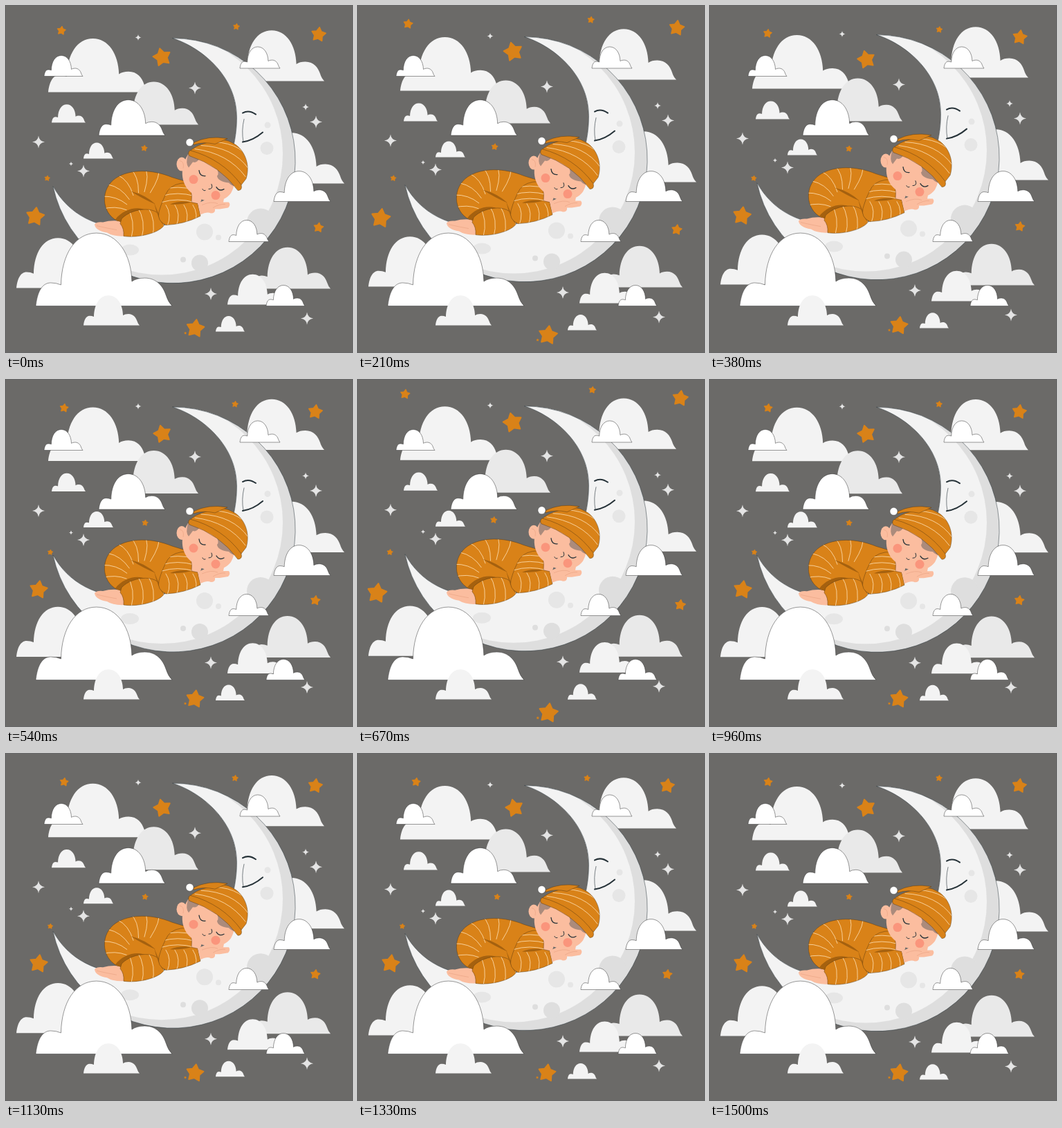
Recreate the animation shown at these times as an HTML page. Size 500x500 px, loop 1.54 s.

```html
<!DOCTYPE html>
<html lang="en">
<head>
<meta charset="utf-8">
<title>Sleeping on the moon</title>
<style>
html, body { margin: 0; width: 100%; height: 100%; overflow: hidden; background: #6b6a68; }
svg { display: block; width: 100vw; height: 100vh; }
.line { fill: none; stroke: #263238; stroke-linecap: round; stroke-linejoin: round; }
.cloth { fill: #d98218; stroke: #5d3a10; stroke-width: .5; }
.skin { fill: #fbbd9f; }
.crease { fill: none; stroke: #e39a7b; stroke-width: .5; }
.stripe { fill: none; stroke: #ffe2b8; stroke-width: .8; stroke-linecap: round; }
.fold { fill: #a5610f; }
.hair { fill: #ab8b7c; }
.cheek { fill: #fa957c; }
.shade { fill: #dedede; }
.crater { fill: #e6e6e6; }
.light { fill: #f3f3f3; }
.grey { fill: #e9e9e9; }
.white { fill: #fff; stroke: #333; stroke-width: .5; }
#stars path { fill: #d98218; stroke: #d98218; stroke-linejoin: round; }
#sparkles { fill: #e4e4e4; }
</style>
</head>
<body>
<svg viewBox="0 0 500 500">
  <defs>
    <path id="moonShape" d="M241 46A177 177 0 1 1 68 260C90 300 130 322 190 322C270 322 333.500 250 333.500 160C333.500 104 287 61 241 46Z"/>
    <path id="backShape" d="M161 310C137 298 136 263 159 248C179 235 211 235 240 247L266 255L268 282L232 314L200 312Z"/>
    <path id="shinShape" d="M167 307C178 295 203 289 217 297Q229 304 228 317C220 328 190 335 170 332Q171 321 165 314Z"/>
    <path id="armShape" d="M234 266Q242 255 262 255Q270 265 268 283L277 285L281 303Q257 315 231 316Q218 310 221 297Q226 279 234 266Z"/>
    <path id="hatShape" d="M264 211Q273 201 290 197Q312 186 332 200C346 210 353 230 347 249L340 258Q311 224 264 211Z"/>
    <clipPath id="moonClip"><use href="#moonShape"/></clipPath>
    <clipPath id="backClip"><use href="#backShape"/></clipPath>
    <clipPath id="shinClip"><use href="#shinShape"/></clipPath>
    <clipPath id="armClip"><use href="#armShape"/></clipPath>
    <clipPath id="hatClip"><use href="#hatShape"/></clipPath>
  </defs>
  <g id="stars"></g>
  <g id="bob">
    <g id="sparkles"></g>
    <g id="backClouds"></g>

    <g id="moon">
      <g clip-path="url(#moonClip)">
        <rect class="shade" x="60" y="40" width="370" height="370"/>
        <circle class="light" cx="225" cy="213" r="175"/>
        <circle class="shade" cx="368" cy="312" r="20"/>
        <circle class="shade" cx="280" cy="371" r="12"/>
        <circle class="shade" cx="256" cy="366" r="4"/>
        <circle class="crater" cx="377" cy="205" r="9.500"/>
        <circle class="crater" cx="378" cy="171.500" r="4.500"/>
        <circle class="crater" cx="287" cy="326" r="12"/>
        <circle class="crater" cx="307" cy="334" r="4"/>
        <ellipse class="crater" cx="179" cy="352" rx="13" ry="8"/>
      </g>
      <use href="#moonShape" class="line" stroke-width=".5"/>
      <path class="line" stroke-width="2" d="M342 154Q351 149 361 156M342 196Q357 194 371 182"/>
      <path class="line" stroke-width=".6" d="M344 163Q340 179 343 196"/>
    </g>

    <g id="baby">
      <path class="skin" d="M128 315Q131 311 140 312Q154 308 168 311L172 332Q155 333 146 327Q129 324 128 315Z"/>
      <path class="crease" d="M131 317Q148 321 160 323"/>

      <use href="#backShape" class="cloth"/>
      <g id="backStripes" clip-path="url(#backClip)"></g>
      <path class="fold" d="M180 267Q201 272 216 286Q199 279 180 267Z"/>
      <path class="fold" d="M158 308C169 293 192 287 204 296Q186 294 174 304L166 312Z"/>
      <use href="#shinShape" class="cloth"/>
      <g id="shinStripes" clip-path="url(#shinClip)"></g>
      <path class="fold" d="M214 284Q220 299 228 317Q219 306 214 284Z"/>

      <path class="skin" d="M248 257L272 258Q291 278 276 288L266 286Z"/>
      <use href="#armShape" class="cloth"/>
      <g id="armStripes" clip-path="url(#armClip)"></g>
      <path class="fold" d="M237 286Q251 280 268 283Q250 287 237 286Z"/>

      <path class="skin" d="M263 214C249 237 254 260 270 271C283 284 313 287 325 270Q331 259 330 250L304 215Z"/>
      <ellipse class="skin" cx="254" cy="228" rx="7.500" ry="10"/>
      <path class="crease" d="M251 223Q258 224 256 234"/>
      <path class="hair" d="M263 214L280 219Q276 227 270 225L264 233Q259 228 263 214Z"/>
      <path class="hair" d="M303 231L334 260Q326 260 322 255Q306 253 305 245Q309 242 303 231Z"/>
      <circle class="cheek" cx="271" cy="250" r="6.500"/>
      <circle class="cheek" cx="303" cy="273" r="6.500"/>
      <path class="line" stroke-width="1.300" d="M279 237Q280 246 288 245M304 261Q308 268 315 264"/>
      <path class="line" stroke-width="1" d="M297 257Q300 264 293 264M284 264Q285 267 288 266"/>

      <path class="skin" d="M277 285Q291 276 303 281L315 278L314 283L322 283Q325 287 321 291L309 293L302 293Q303 299 296 299Q291 296 281 301Z"/>
      <path class="crease" d="M283 287Q297 281 306 285M299 291Q309 285 317 286"/>

      <use href="#hatShape" class="cloth"/>
      <g id="hatStripes" clip-path="url(#hatClip)"></g>
      <path class="cloth" d="M271 197Q292 186 320 191L302 199Q285 195 271 200Z"/>
      <path class="cloth" d="M266 208Q313 221 340 258Q342 266 335 266Q309 230 265 216Q262 212 266 208Z"/>
      <circle cx="265.500" cy="196.500" r="5.500" fill="#fff" stroke="#444" stroke-width=".4"/>
    </g>
  </g>
  <g id="frontClouds"></g>
</svg>

<script>
const LOOP = 1540;
const byId = id => document.getElementById(id);

function add(parent, d, attrs) {
  const p = document.createElementNS("http://www.w3.org/2000/svg", "path");
  p.setAttribute("d", d);
  for (const k in attrs) p.setAttribute(k, attrs[k]);
  byId(parent).appendChild(p);
}

// One cloud outline, 100 wide, standing on y = 0
const CLOUD = "M0 0C1 -9 4 -17 11 -17Q15 -17 18.5 -15.5C19 -38 29 -53.5 44.5 -53.5" +
  "S70 -38 70.5 -18Q74 -20.5 80 -20.5C89 -20.5 93.5 -14 95.5 -8Q97 -3 100 0Z";

function cloud(parent, kind, x, base, width) {
  add(parent, CLOUD, {
    class: kind, "vector-effect": "non-scaling-stroke",
    transform: `translate(${x} ${base}) scale(${width / 100})`
  });
}
const drift = (...c) => cloud("backClouds", "light", ...c);
const still = (...c) => cloud("frontClouds", "white", ...c);

drift(61, 124, 145);
cloud("backClouds", "grey", 162, 171, 116);
drift(66, 168, 49);
drift(112, 220, 43);
drift(323, 108, 137);
drift(352, 256, 137);
cloud("backClouds", "grey", 357, 408, 112);
drift(320, 431, 82);
drift(303, 470, 42);
drift(15, 407, 135);

still(55, 101.5, 56);
still(134, 187, 96);
still(338, 90, 58);
still(387, 282.5, 82);
still(322, 340.5, 58);
still(376, 433.5, 56);
still(43, 433.5, 197);
cloud("frontClouds", "light", 112, 461.5, 81);

function star(x, y, r, turn = 8) {
  const pts = [];
  for (let i = 0; i < 10; i++) {
    const a = (turn - 90 + i * 36) * Math.PI / 180, q = r * (i % 2 ? .53 : .94);
    pts.push((x + q * Math.cos(a)).toFixed(2) + " " + (y + q * Math.sin(a)).toFixed(2));
  }
  add("stars", "M" + pts.join("L") + "Z", { "stroke-width": r * .14 });
}
star(84, 40.5, 6.8);
star(447, 46, 11);
star(226, 78, 13.5, -14);
star(331, 35, 5);
star(201, 206.5, 4.8);
star(64, 249, 4.3);
star(47, 303, 13.7);
star(447, 318.5, 7.5);
star(273, 461, 13.5);
star(259, 467.5, 1.9);

function sparkle(x, y, r = 9) {
  const k = r * .12;
  add("sparkles", `M${x} ${y - r}Q${x + k} ${y - k} ${x + r} ${y}Q${x + k} ${y + k} ${x} ${y + r}` +
    `Q${x - k} ${y + k} ${x - r} ${y}Q${x - k} ${y - k} ${x} ${y - r}Z`);
}
sparkle(191, 45, 4.5);
sparkle(273, 118);
sparkle(47, 196);
sparkle(112, 238);
sparkle(94, 227.5, 3);
sparkle(433, 145.5, 5);
sparkle(448, 167);
sparkle(296, 415.5);
sparkle(435, 451);

// Pyjama stripes: evenly spaced bowed lines, cut off by the cloth
const stripe = (id, x, y, bx, by, X, Y) => add(id, `M${x} ${y}Q${bx} ${by} ${X} ${Y}`, { class: "stripe" });
for (let i = 0; i < 7; i++) {
  const a = (175 + i * 19) * Math.PI / 180, c = Math.cos(a), s = Math.sin(a);
  stripe("backStripes", 200 + 62 * c, 288 + 56 * s, 208 + 50 * c, 284 + 42 * s, 200 + 26 * c, 292 + 24 * s);
}
for (let x = 178; x < 228; x += 15) stripe("shinStripes", x - 3, 290, x + 10, 310, x + 3, 335);
for (let x = 233; x < 280; x += 13) stripe("armStripes", x - 2, 287, x + 7, 300, x, 318);
for (let y = 262; y < 284; y += 9) stripe("armStripes", 225, y + 3, 248, y - 4, 272, y + 3);
for (let i = 1; i < 5; i++) {
  stripe("hatStripes", 264 + i * 9, 211 - i * 5, 314 + i * 7, 221 - i * 9, 342 + i * 4, 258 - i * 12);
}

const ease = x => { x = Math.min(1, Math.max(0, x)); return x * x * (3 - 2 * x); };
const beat = (t, start, peak, end) =>
  t < peak ? ease((t - start) / (peak - start)) : 1 - ease((t - peak) / (end - peak));

function draw(ms) {
  const t = ms % LOOP;
  const y = .6 - 4.5 * (1 - Math.cos((t + 30) / LOOP * 2 * Math.PI));
  byId("bob").setAttribute("transform", `translate(0 ${y.toFixed(3)})`);

  // Two heartbeats, the first one starting just before the loop ends
  const p = t > LOOP - 40 ? t - LOOP : t;
  const size = 1 + .1 * (beat(p, -40, 90, 420) + beat(p, 540, 690, 900));
  byId("stars").setAttribute("transform", `translate(251 250) scale(${size.toFixed(4)}) translate(-251 -250)`);
}

const begin = performance.now();
function tick() {
  draw(performance.now() - begin);
  requestAnimationFrame(tick);
}
draw(0);
requestAnimationFrame(tick);
</script>
</body>
</html>
```
